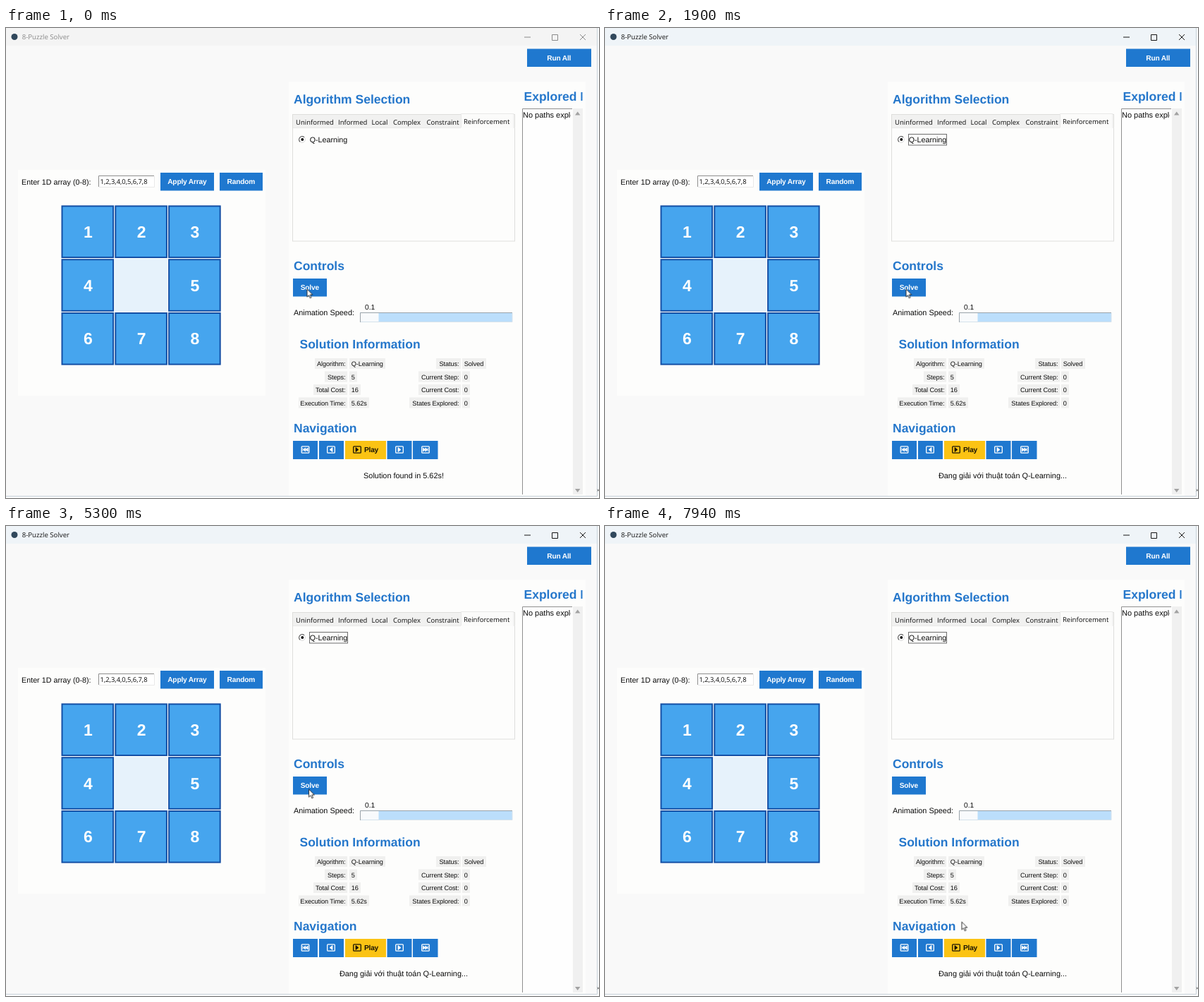
Recreate the animation shown at these times as an HTML page. Size 841 px wide and 666 px high, loop 8 s.

```html
<!DOCTYPE html>
<html lang="en">
<head>
<meta charset="utf-8">
<title>8-Puzzle Solver</title>
<style>
html, body { margin: 0; width: 100%; height: 100%; overflow: hidden; background: #f9f9f9; }
svg { display: block; width: 841px; height: 666px; font: 10.9px "Liberation Sans", Arial, sans-serif; fill: #0c0c0c; }
text { white-space: pre; text-rendering: geometricPrecision; }
.head { font-size: 17.5px; font-weight: bold; fill: #2577cb; }
.btn { font-size: 10.2px; letter-spacing: -.2px; font-weight: bold; fill: #fff; text-anchor: middle; }
.ui { font-family: "Open Sans", "Noto Sans", sans-serif; font-size: 9.5px; }
.info { font-size: 9.2px; letter-spacing: -.08px; }
.digit { font-size: 23px; font-weight: bold; fill: #fff; text-anchor: middle; }
.end { text-anchor: end; }
.mid { text-anchor: middle; }
.before { animation: before 8s step-end infinite; }
.after { animation: after 8s step-end infinite; }
.cursor { animation: travel 8s linear infinite; }
@keyframes before { 0% { visibility: visible; } 3.75%, 100% { visibility: hidden; } }
@keyframes after { 0% { visibility: hidden; } 3.75%, 100% { visibility: visible; } }
@keyframes travel {
  0%, 65.5% { transform: translate(426.5px, 369.5px); }
  66.25% { transform: translate(429px, 372.5px); animation-timing-function: ease-in-out; }
  76.25%, 100% { transform: translate(505.5px, 560.5px); }
}
</style>
</head>
<body>
<svg viewBox="0 0 841 666">
  <defs>
    <g id="title">
      <text class="ui" x="22.7" y="16.3" style="font-size:9.65px" fill="currentColor">8-Puzzle Solver</text>
      <path d="M735 13h9M774.5 9.5h8v8h-8zM814 9l8 8m0-8l-8 8" fill="none" stroke="currentColor"/>
    </g>
    <clipPath id="headClip"><rect x="730" y="80" width="87.5" height="30"/></clipPath>
    <clipPath id="listClip"><rect x="732" y="114" width="69" height="20"/></clipPath>
  </defs>

  <rect width="841" height="666" fill="#f9f9f9"/>
  <g class="before" color="#8a8a8a"><rect width="838" height="25" fill="#f4f4f4"/><use href="#title"/></g>
  <g class="after" color="#161616"><rect width="838" height="25" fill="#eff4f8"/><use href="#title"/></g>
  <circle cx="12" cy="12.5" r="4.5" fill="#31485c"/>

  <rect x="17" y="201" width="351" height="320" fill="#fdfdfc"/>
  <rect x="401" y="76" width="421" height="587" fill="#fdfdfc"/>

  <!-- array input -->
  <text x="22" y="221.7" style="font-size:10.75px">Enter 1D array (0-8):</text>
  <rect x="131" y="209" width="80" height="17" fill="#fff"/>
  <path d="M131.5 225V209.5H210" fill="none" stroke="#8d8d8d"/>
  <path d="M132 225.5h78.5V210" fill="none" stroke="#e9e9e9"/>
  <text class="ui" x="133.5" y="221" style="font-size:9.45px">1,2,3,4,0,5,6,7,8</text>

  <g id="board"></g>

  <!-- algorithm tabs -->
  <text class="head" x="408" y="107">Algorithm Selection</text>
  <rect x="406.5" y="122.5" width="315" height="179.5" fill="#fdfdfc" stroke="#dededc"/>
  <rect x="407" y="123" width="238" height="18" fill="#f1f1f0"/>
  <path d="M407 141.5H645M720 141.5h2" stroke="#e9e9e8"/>
  <rect x="645" y="121" width="75" height="21" fill="#fbfbfa"/>
  <path d="M645.5 141v-19.5h74.5v19.5" fill="none" stroke="#e9e9e8"/>
  <g id="tabs"></g>
  <circle cx="420" cy="158" r="4.3" fill="#fff" stroke="#d8d8d8"/>
  <path d="M417 161.2a4.3 4.3 0 0 1 6-6.3" fill="none" stroke="#555" stroke-width="1.2"/>
  <circle cx="420.3" cy="158" r="2" fill="#111"/>
  <text x="430.7" y="162" style="font-size:10.7px">Q-Learning</text>
  <rect class="after" x="430.5" y="150.5" width="54" height="15.5" fill="none" stroke="#6e6e6e"/>

  <!-- controls -->
  <text class="head" x="408" y="343">Controls</text>
  <text x="408" y="406.7">Animation Speed:</text>
  <text class="mid" x="516.2" y="399" style="font-size:10.2px">0.1</text>
  <rect x="502" y="403" width="216" height="14" fill="#bbdefb"/>
  <rect x="503" y="404" width="25.5" height="12.5" fill="#f8fafc"/>
  <path d="M502.5 417V403.5H718" fill="none" stroke="#9aa3aa"/>
  <path d="M503 416.5h215V404" fill="none" stroke="#d5e2ec"/>

  <text class="head" x="416.5" y="454">Solution Information</text>
  <g id="info"></g>

  <text class="head" x="408" y="573">Navigation</text>
  <g id="buttons"></g>
  <g id="icons"></g>
  <text class="mid before" x="564" y="638.2">Solution found in 5.62s!</text>
  <text class="mid after" x="564" y="638.2">Đang giải với thuật toán Q-Learning...</text>

  <!-- explored list -->
  <text class="head" x="734.5" y="103.2" clip-path="url(#headClip)">Explored Paths</text>
  <rect x="732" y="114" width="71" height="547" fill="#fefefe"/>
  <path d="M732.5 661V114.5H803" fill="none" stroke="#8f8f8f"/>
  <text x="733" y="126.5" style="font-size:11px" clip-path="url(#listClip)">No paths explored</text>
  <rect x="804" y="114" width="14" height="547" fill="#f0f0f0"/>
  <path d="M807 123.5l3.7-5 3.7 5zM807 653l3.7 5 3.7-5z" fill="#a2a2a2"/>

  <!-- window edge -->
  <rect x="0" y="664" width="841" height="2" fill="#fdfdfd"/>
  <rect x="839" y="0" width="2" height="666" fill="#fdfdfd"/>
  <path d="M0 663.5h838.5V0" fill="none" stroke="#c5d0d7"/>
  <path d="M838.5 653.5l2.5 3m0-3l-2.5 3" stroke="#777" fill="none"/>

  <path class="cursor" d="M.5 .5v11l2.5-2.3 1.8 4 1.8-.8-1.8-3.9h3.5z" fill="#fff" stroke="#222" stroke-width=".9"/>
</svg>
<script>
const fill = (id, parts) => { document.getElementById(id).innerHTML = parts.join(""); };
const rect = (x, y, w, h, color, more = "") =>
  `<rect x="${x}" y="${y}" width="${w}" height="${h}" fill="${color}" ${more}/>`;
const text = (cls, x, y, str, more = "") => `<text class="${cls}" x="${x}" y="${y}" ${more}>${str}</text>`;

// puzzle tiles
fill("board", [1, 2, 3, 4, 0, 5, 6, 7, 8].map((n, i) => {
  const x = 78.5 + (i % 3) * 75.8, y = 251.4 + Math.floor(i / 3) * 75.8;
  return n
    ? rect(x + 1, y + 1, 72.6, 72.6, "#46a5ee", 'stroke="#134fa5" stroke-width="2"') +
      text("digit", x + 37.8, y + 45.4, n)
    : rect(x, y, 74.6, 74.6, "#e6f2fb");
}));

fill("tabs", [["Uninformed", 411], ["Informed", 471], ["Local", 518.5], ["Complex", 549],
  ["Constraint", 596.5], ["Reinforcement", 649]]
  .map(([name, x], i) => text("ui", x, i === 5 ? 135.7 : 137, name)));

// label, label left, value, value right
const columns = [
  [484, 487, [["Algorithm:", 438, "Q-Learning", 538], ["Steps:", 452, "5", 498],
    ["Total Cost:", 436, "16", 503], ["Execution Time:", 415, "5.62s", 515]]],
  [645, 647, [["Status:", 610, "Solved", 681], ["Current Step:", 585, "0", 658],
    ["Current Cost:", 585, "0", 658], ["States Explored:", 572, "0", 658]]]
];
fill("info", columns.flatMap(([end, start, rows]) => rows.map(([label, left, value, right], i) => {
  const y = 468 + i * 18.5;
  return rect(left, y, end - left, 15, "#f0f0ef") + rect(start, y, right - start, 15, "#f0f0ef") +
    text("info end", end - 2.5, y + 11, label) + text("info", start + 2.7, y + 11, value);
})));

const blue = "#1f78cf";
fill("buttons", [
  [739, 29.5, 91, 25.5, "Run All"], [219, 205, 76, 25.5, "Apply Array"],
  [303, 205, 61, 25.5, "Random"], [407, 355, 48, 25.5, "Solve"],
  [407, 585, 35, 26], [444, 585, 35, 26], [481, 585, 58, 26],
  [540.5, 585, 35, 26], [577, 585, 35.5, 26]
].map(([x, y, w, h, label], i) => rect(x, y, w, h, i === 6 ? "#fbc314" : blue) +
  (label ? text("btn", x + w / 2 - .2, y + 16.2, label) : "")));

// boxed media symbols
const arrows = {
  first: "M-3.6-2.5v5M.2-2.5v5l-3.4-2.5zM3.6-2.5v5l-3.4-2.5z",
  prev: "M2-3v6l-4-3z",
  next: "M-2-3v6l4-3z",
  last: "M3.6-2.5v5M-.2-2.5v5l3.4-2.5zM-3.6-2.5v5l3.4-2.5z"
};
const icon = (x, kind, color = "#fff") => `<g transform="translate(${x} 597.5)" color="${color}">
  <rect x="-5.3" y="-4.7" width="10.6" height="9.4" rx="1" fill="none" stroke="currentColor" stroke-width="1.3"/>
  <path d="${arrows[kind]}" fill="currentColor" stroke="currentColor" stroke-width=".8"/></g>`;
fill("icons", [
  icon(424.5, "first"), icon(461, "prev"), icon(498, "next", "#1b1505"),
  icon(558, "next"), icon(595, "last"),
  text("btn", 518, 601.2, "Play", 'style="fill:#1b1505"')
]);
</script>
</body>
</html>
```
